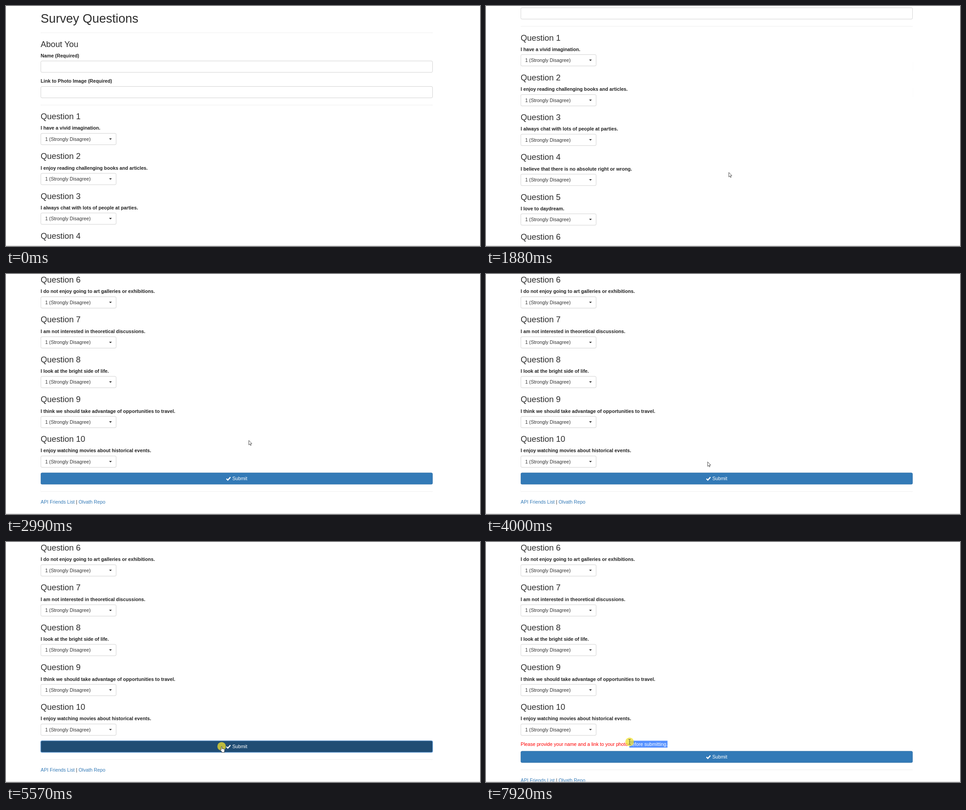
An HTML page that plays this animation: 1053x532 px, repeating every 8 s.

```html
<!DOCTYPE html>
<html lang="en">
<head>
<meta charset="utf-8">
<title>Survey</title>
<style>
  html, body { margin: 0; width: 100%; height: 100%; overflow: hidden; background: #fff; }
  #stage { position: relative; width: 1053px; height: 532px; overflow: hidden; }
  #stage::after {
    content: ""; position: absolute; left: 0; right: 0; top: 531px; height: 1px; background: #cfcfcf;
  }
  #page {
    position: absolute; left: 77px; top: 12.9px; width: 1140px; transform-origin: 0 0;
    font: 14px/20px "Liberation Sans", Arial, sans-serif; color: #333;
  }
  #page * { box-sizing: border-box; }
  h1, h3 { font-weight: 400; line-height: 1.1; color: #2c2c2c; }
  h1 { margin: 0 0 10px; font-size: 36px; }
  h3 { margin: 20px 0 10px; font-size: 24px; }
  hr { margin: 20px 0; border: 0; border-top: 1px solid #e8e8e8; }
  .group { margin-bottom: 15px; }
  .label { margin-bottom: 5px; font-weight: 700; color: #222; }
  .field, .select { height: 34px; border: 1px solid #c4c4c4; border-radius: 4px; }
  .select { position: relative; width: 220px; padding: 6px 12px; }
  .select::after {
    content: ""; position: absolute; right: 12px; top: 14px;
    border: 4px solid transparent; border-top-color: #222; border-bottom: 0;
  }
  #error { margin: 0 0 10px; height: 20px; color: #f00; white-space: pre; }
  #picked { padding: 2px 0; color: #fff; background: #5590ff; }
  #submit {
    height: 34px; padding: 6px 12px; border: 1px solid; border-radius: 4px;
    text-align: center; line-height: 20px;
  }
  #submit span { color: #fff; }
  #submit svg { width: 14px; height: 14px; vertical-align: -2px; }
  #submit.idle { background: #337ab7; border-color: #2e6da4; }
  #submit.hover { background: #286090; border-color: #204d74; }
  #submit.active { background: #204d74; border-color: #122b40; }
  #submit.focus { border-color: #5b97d4; box-shadow: 0 0 0 1px #a9caee; }
  .link { color: #337ab7; }
  #pointer { position: absolute; left: 0; top: 0; overflow: visible; }
  #pointer path { stroke-linejoin: round; }
</style>
</head>
<body>
<div id="stage">
  <div id="page">
    <h1>Survey Questions</h1>
    <hr>
    <h3>About You</h3>
    <div class="group"><div class="label">Name (Required)</div><div class="field"></div></div>
    <div class="group"><div class="label">Link to Photo Image (Required)</div><div class="field"></div></div>
    <hr>
    <div id="questions"></div>
    <p id="error"><span id="plain"></span><span id="picked"></span></p>
    <div id="submit"><span><svg viewBox="0 0 14 14"><path d="M1.2 7.4 5.2 11.4 12.8 3" fill="none" stroke="#fff" stroke-width="3.2"/></svg> Submit</span></div>
    <hr>
    <div><span class="link">API Friends List</span> | <span class="link">Olvath Repo</span></div>
  </div>
  <svg id="pointer" width="1" height="1">
    <circle id="ring" r="9.5" fill="#f0e02c" fill-opacity=".75"/>
    <path id="arrow" d="M.4 .4V10.4L2.7 8.3 4.2 11.7 5.7 11 4.2 7.6H7.3Z" fill="#fff" stroke="#222" stroke-width=".8"/>
    <path id="hand" d="M-1 7.8V1Q0-.8 1 1V5L5.8 6Q7 6.4 6.9 8L6.2 11V13.4H.2V11.8L-3.6 7.4Q-3.4 5.6-1 7.8Z" fill="#fff" stroke="#222" stroke-width=".8"/>
    <path id="beam" d="M-2.5-5.5H-.6L0-5 .6-5.5H2.5M0-5V5M-2.5 5.5H-.6L0 5 .6 5.5H2.5" fill="none" stroke="#444" stroke-width=".9"/>
  </svg>
</div>
<script>
const LOOP = 8000, SCALE = 0.764;
const MESSAGE = "Please provide your name and a link to your photo before submitting.";
const QUESTIONS = [
  "I have a vivid imagination.",
  "I enjoy reading challenging books and articles.",
  "I always chat with lots of people at parties.",
  "I believe that there is no absolute right or wrong.",
  "I love to daydream.",
  "I do not enjoy going to art galleries or exhibitions.",
  "I am not interested in theoretical discussions.",
  "I look at the bright side of life.",
  "I think we should take advantage of opportunities to travel.",
  "I enjoy watching movies about historical events."
];

// Each row: start time, then the values held until the next row.
const SCROLL = [
  [0, 0], [1280, 12], [1380, 62], [1480, 98], [1590, 143], [1690, 153],
  [1880, 174.6], [1990, 229], [2130, 247], [2220, 298], [2320, 346], [2410, 390],
  [2500, 438.8], [2610, 515], [2710, 597], [2800, 655], [2900, 671.9], [2990, 672.7]
];
const POINTER = [
  [0, 0, 0, ""],
  [320, 771, 446, "arrow"], [400, 692, 417, "arrow"], [490, 612, 390, "arrow"],
  [570, 556, 373, "arrow"], [650, 539, 368.5, "arrow"],
  [3600, 538, 371, "arrow"], [3680, 533, 378, "arrow"], [3760, 523, 389, "arrow"],
  [3840, 509, 402, "arrow"], [3920, 492, 416, "arrow"], [4010, 475, 430, "arrow"],
  [4090, 460, 442, "hand"], [4170, 449, 450, "hand"], [4250, 442, 455, "hand"],
  [4330, 438, 457, "hand"], [4410, 436, 457, "hand"], [4490, 433, 458, "hand"],
  [4570, 430, 460, "hand"], [4660, 427, 462, "hand"], [4740, 425, 465, "hand"],
  [4820, 424, 468, "arrow"], [4910, 424, 470, "arrow"], [4990, 424, 471, "arrow"],
  [5170, 432, 467, "arrow"], [5250, 450, 460, "hand"], [5340, 470, 455, "hand"],
  [5420, 479, 453, "hand"], [5740, 479, 453, "arrow"],
  [6220, 448, 446, "arrow"], [6290, 428, 441, "arrow"], [6810, 427, 441, "arrow"],
  [7440, 426, 441, "arrow"], [7580, 413, 442, "arrow"], [7660, 404, 443, "beam"],
  [7750, 378, 443, "beam"], [7840, 343, 443, "beam"], [7920, 319, 443, "beam"]
];
const BUTTON = [
  [0, "idle"], [4090, "hover"], [4910, "idle"], [5250, "hover"],
  [5570, "active focus"], [5660, "hover focus"], [7660, "idle"]
];
const RING = [[0, 0], [810, 1], [910, 0], [5570, 1], [5740, 0], [7660, 1]];
const ERROR = [[0, 0], [5660, 1]];
const PICKED = [[0, 0], [7750, 5], [7840, 13], [7920, 18]];

const $ = id => document.getElementById(id);
const at = (steps, t) => steps.findLast(row => row[0] <= t).slice(1);
const show = (el, on) => { el.style.display = on ? "" : "none"; };

$("questions").innerHTML = QUESTIONS.map((text, i) =>
  `<h3>Question ${i + 1}</h3><div class="group"><div class="label">${text}</div>` +
  `<div class="select">1 (Strongly Disagree)</div></div>`).join("");

function draw(t) {
  const [scroll] = at(SCROLL, t);
  $("page").style.transform = `translateY(${-scroll}px) scale(${SCALE})`;

  const [x, y, shape] = at(POINTER, t);
  $("pointer").style.transform = `translate(${x}px, ${y}px)`;
  for (const id of ["arrow", "hand", "beam"]) show($(id), id === shape);
  show($("ring"), at(RING, t)[0]);

  $("submit").className = at(BUTTON, t)[0];

  const cut = MESSAGE.length - at(PICKED, t)[0];
  show($("error"), at(ERROR, t)[0]);
  $("plain").textContent = MESSAGE.slice(0, cut);
  $("picked").textContent = MESSAGE.slice(cut);
}

function tick() {
  draw(performance.now() % LOOP);
  requestAnimationFrame(tick);
}
tick();
</script>
</body>
</html>
```
